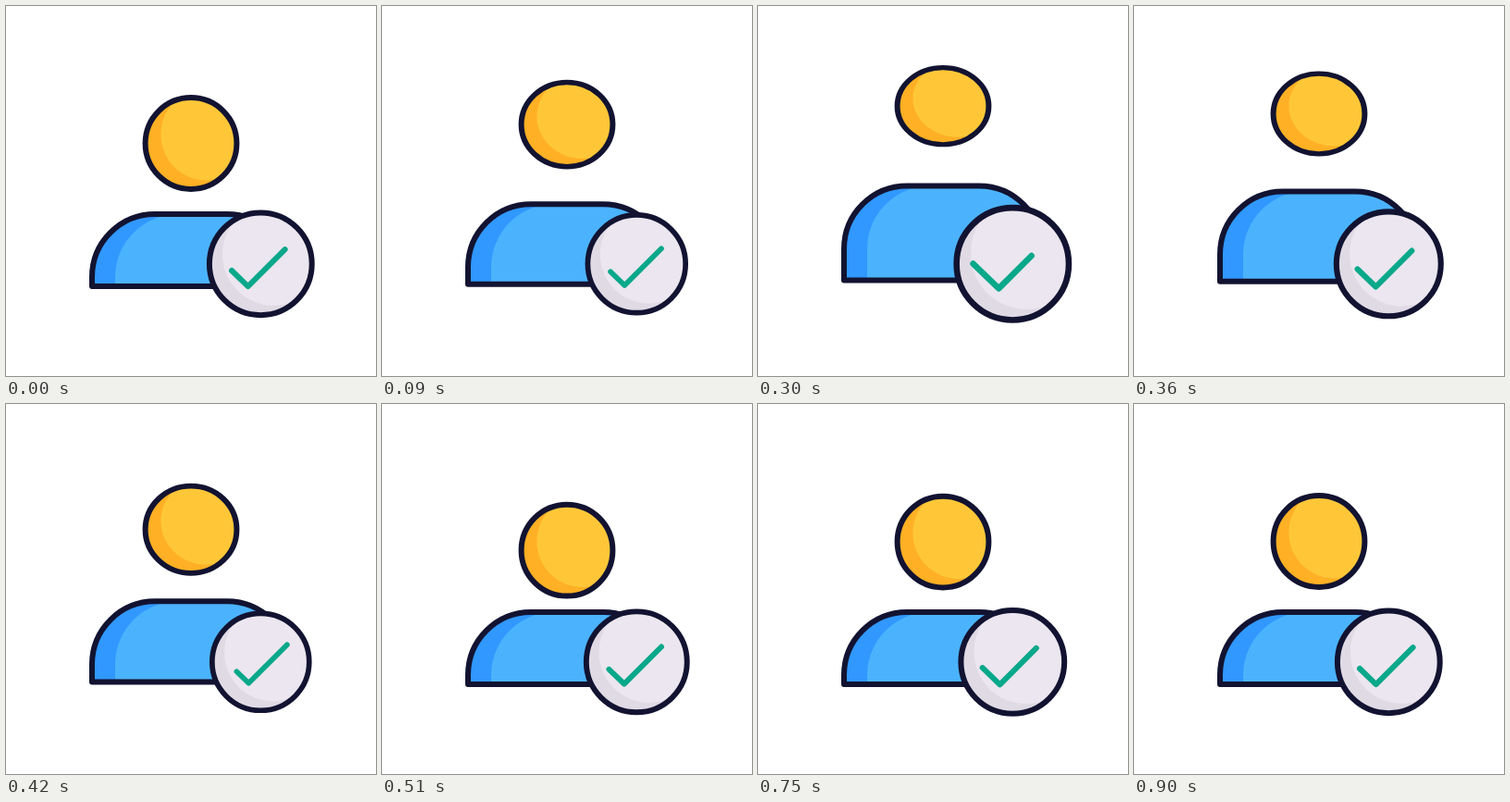
An HTML page for the animation above (1960 ms loop, 400x400 px).

```html
<!DOCTYPE html>
<html lang="en">
<head>
<meta charset="utf-8">
<title>User check</title>
<style>
  html, body { margin: 0; height: 100%; overflow: hidden; background: #fff; }
  svg { display: block; width: 100%; height: 100%; }
  .line { fill: none; stroke: #121331; stroke-width: 6; stroke-linejoin: round; }
</style>
</head>
<body>
<svg viewBox="0 0 400 400">
  <defs>
    <clipPath id="headClip"><circle r="49.4"/></clipPath>
    <clipPath id="bodyClip"><path class="torso"/></clipPath>
    <clipPath id="badgeClip"><circle r="55.4"/></clipPath>
  </defs>
  <g id="head">
    <circle r="49.4" fill="#ffb024"/>
    <circle cx="16.8" cy="-9.5" r="49.4" fill="#ffc738" clip-path="url(#headClip)"/>
    <circle r="49.4" class="line"/>
  </g>
  <g>
    <path class="torso" fill="#3098ff"/>
    <g clip-path="url(#bodyClip)"><path class="torso" fill="#4bb3fd" transform="translate(25)"/></g>
    <path class="torso line"/>
  </g>
  <g id="badge">
    <circle r="55.4" fill="#e0dae5"/>
    <circle cx="14" cy="-10.5" r="55.4" fill="#ebe6ef" clip-path="url(#badgeClip)"/>
    <circle r="55.4" class="line"/>
    <path id="check" fill="none" stroke="#08a88a" stroke-width="6" stroke-linecap="round" stroke-linejoin="round"/>
  </g>
</svg>
<script>
  const LOOP = 1960;
  const CHECK_LENGTH = 57.6;
  const byId = id => document.getElementById(id);
  const head = byId('head'), badge = byId('badge'), check = byId('check');
  const torsos = document.querySelectorAll('.torso');

  // Each track is a list of [time in ms, value].
  const headY = [[0, 148.5], [180, 108.4], [300, 108.2], [530, 159], [680, 149.2], [900, 148.5]];
  const headSquash = [[0, 1], [180, 0.848], [300, 0.842], [490, 1]];
  const bodyTop = [[0, 225], [225, 194.2], [300, 194.5], [510, 225]];
  const badgeScale = [[0, 1], [180, 0.91], [300, 1.095], [420, 0.947], [600, 1.018], [900, 1]];
  const checkSlide = [[0, 17.6], [180, 14.3], [300, 25.3], [420, 13.7], [600, 19.6], [900, 17.6]];

  const ease = p => (1 - Math.cos(Math.PI * p)) / 2;

  function sample(track, t) {
    const i = track.findIndex(([time]) => time > t);
    if (i < 0) return track[track.length - 1][1];
    const [t0, v0] = track[i - 1], [t1, v1] = track[i];
    return v0 + (v1 - v0) * ease((t - t0) / (t1 - t0));
  }

  function drawBody(top) {
    const bottom = 303 - (225 - top) * 0.21;
    const d = `M93 ${bottom}V${top + 68}A68 68 0 0 1 161 ${top}H239A68 68 0 0 1 307 ${top + 68}V${bottom}Z`;
    torsos.forEach(path => path.setAttribute('d', d));
  }

  // The tick slides along its own bent path.
  function drawCheck(short) {
    const long = CHECK_LENGTH - short;
    check.setAttribute('d',
      `M${-13.7 - short} ${24.3 - short * 0.97}L-13.7 24.3L${-13.7 + long} ${24.3 - long}`);
  }

  function draw(t) {
    head.setAttribute('transform', `translate(200 ${sample(headY, t)}) scale(1 ${sample(headSquash, t)})`);
    drawBody(sample(bodyTop, t));
    badge.setAttribute('transform', `translate(275.3 278.8) scale(${sample(badgeScale, t)})`);
    drawCheck(sample(checkSlide, t));
  }

  const start = performance.now();
  function tick() {
    draw((performance.now() - start) % LOOP);
    requestAnimationFrame(tick);
  }
  tick();
</script>
</body>
</html>
```
